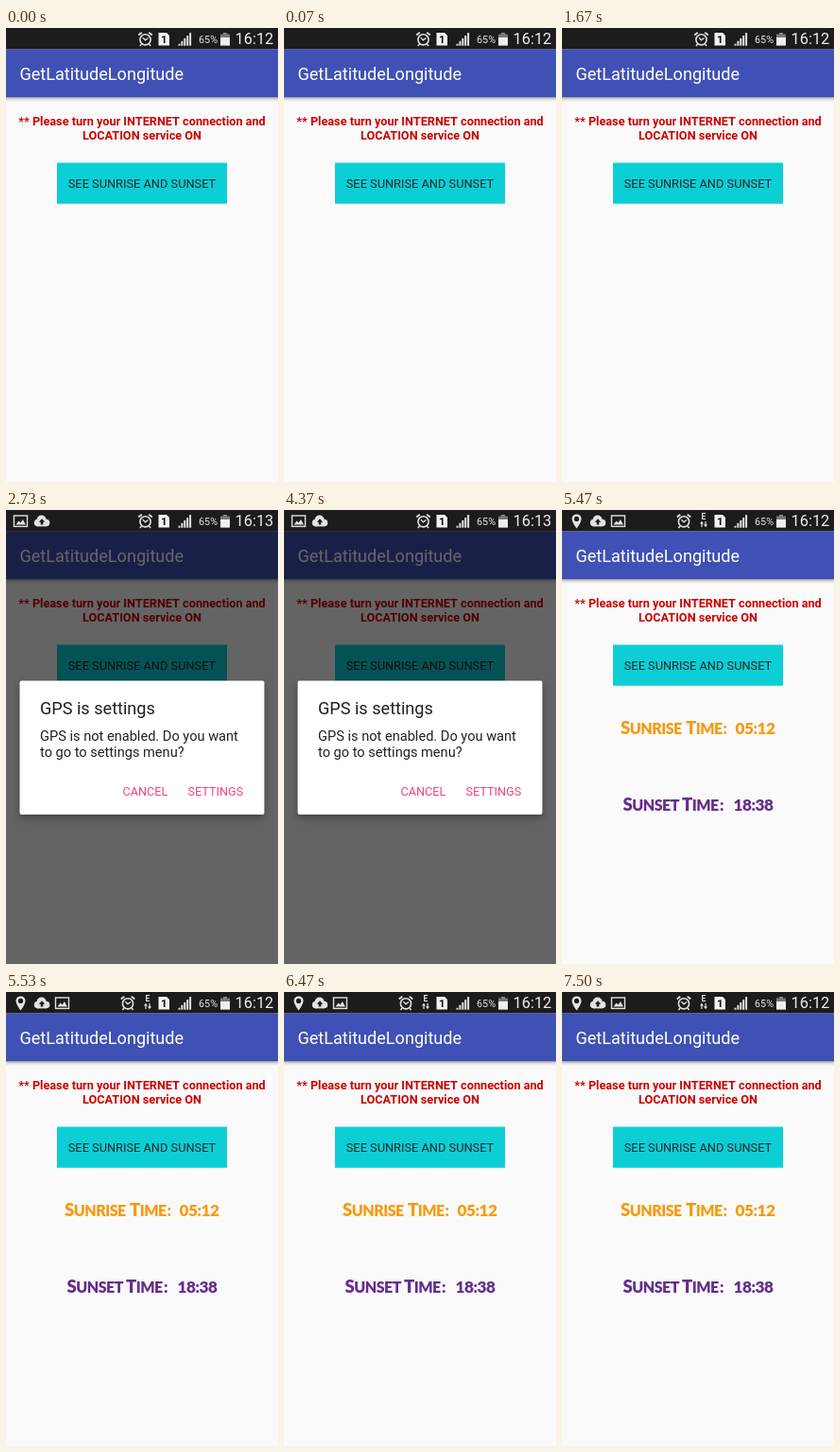
An HTML page with a canvas that plays this animation: 288x480 px, repeating every 8.19 s.

```html
<!DOCTYPE html>
<html lang="en">
<head>
<meta charset="utf-8">
<title>GetLatitudeLongitude</title>
<style>
  html, body { margin: 0; width: 100%; height: 100%; overflow: hidden; background: #fafafa; }
  canvas { display: block; width: 288px; height: 480px; }
</style>
</head>
<body>
<canvas id="stage"></canvas>
<script>
const W = 288, H = 480, LOOP = 8190, DIALOG_AT = 2730, RESULT_AT = 5470;
const canvas = document.getElementById('stage');
const ctx = canvas.getContext('2d');
const dpr = window.devicePixelRatio || 1;
canvas.width = W * dpr;
canvas.height = H * dpr;
ctx.scale(dpr, dpr);

const ICON = '#e2e2e2', BAR = '#1c1c1c', BAR_H = 22.4;
const DISPLAY = { weight: 900, family: 'Lato, sans-serif', spacing: -0.5 };

function rect(x, y, w, h, color) {
  ctx.fillStyle = color;
  ctx.fillRect(x, y, w, h);
}

function text(str, x, y, size, color, { weight = 400, align = 'left', family = 'Roboto, sans-serif', spacing = 0 } = {}) {
  ctx.font = `${weight} ${size}px ${family}`;
  ctx.letterSpacing = spacing + 'px';
  ctx.textAlign = align;
  ctx.fillStyle = color;
  ctx.fillText(str, x, y);
}

function disc(x, y, r, color) {
  ctx.fillStyle = color;
  ctx.beginPath();
  ctx.arc(x, y, r, 0, Math.PI * 2);
  ctx.fill();
}

function poly(points, color) {
  ctx.fillStyle = color;
  ctx.beginPath();
  points.forEach(([x, y]) => ctx.lineTo(x, y));
  ctx.fill();
}

function line(points, width, color) {
  ctx.strokeStyle = color;
  ctx.lineWidth = width;
  ctx.beginPath();
  points.forEach(([x, y], i) => i ? ctx.lineTo(x, y) : ctx.moveTo(x, y));
  ctx.stroke();
}

function alarm(x) {
  ctx.strokeStyle = ICON;
  ctx.lineWidth = 1.6;
  ctx.beginPath();
  ctx.arc(x, 12.3, 5.6, 0, Math.PI * 2);
  ctx.stroke();
  line([[x - 2.6, 10.2], [x, 12.8], [x + 3, 10.6]], 1.3, ICON);
  for (const s of [-1, 1]) {
    line([[x + s * 7.3, 7.4], [x + s * 3.7, 4.8]], 1.8, ICON);
    line([[x + s * 4, 17], [x + s * 5.6, 19]], 1.5, ICON);
  }
}

function sim() {
  poly([[161.5, 5], [170, 5], [173, 8], [173, 18.5], [161.5, 18.5]], '#f2f2f2');
  text('1', 167.3, 16, 11.5, '#111', { weight: 700, align: 'center' });
}

function signal() {
  for (let i = 0; i < 5; i++) {
    const h = 2 + i * 2.9;
    rect(182.5 + i * 2.9, 18.7 - h, 2, h, ICON);
  }
}

function battery() {
  rect(230, 5, 4, 2, '#8a8a8a');
  rect(227, 6.5, 10, 12, '#777');
  rect(227, 10, 10, 8.5, '#eee');
}

function picture(x) {
  ctx.strokeStyle = ICON;
  ctx.lineWidth = 1.4;
  ctx.strokeRect(x - 7, 6, 14, 11.4);
  poly([[x - 5, 15.5], [x - 2, 11.5], [x, 13.4], [x + 2.4, 10], [x + 5.4, 15.5]], ICON);
}

function cloud(x) {
  disc(x - 4.4, 13.6, 3.8, ICON);
  disc(x - 0.4, 10.6, 5, ICON);
  disc(x + 4.5, 13.5, 3.8, ICON);
  rect(x - 4.4, 12, 9, 5.4, ICON);
  poly([[x, 9.2], [x + 3.2, 12.7], [x + 1.3, 12.7], [x + 1.3, 15.6], [x - 1.3, 15.6], [x - 1.3, 12.7], [x - 3.2, 12.7]], BAR);
}

function pin(x) {
  ctx.fillStyle = ICON;
  ctx.beginPath();
  ctx.arc(x, 9.4, 5, Math.PI, 0);
  ctx.quadraticCurveTo(x + 4.8, 13, x, 19.5);
  ctx.quadraticCurveTo(x - 4.8, 13, x - 5, 9.4);
  ctx.fill();
  disc(x, 9.4, 2.6, BAR);
}

function edge(x) {
  text('E', x, 10, 8.5, ICON, { weight: 700, align: 'center' });
  poly([[x - 4, 14.5], [x - 2, 11.8], [x, 14.5]], ICON);
  rect(x - 2.6, 14, 1.2, 4, ICON);
  poly([[x, 15.3], [x + 4, 15.3], [x + 2, 18.2]], ICON);
  rect(x + 1.4, 12, 1.2, 4, ICON);
}

function statusBar(scene) {
  rect(0, 0, W, BAR_H, BAR);
  if (scene === 'dialog') {
    picture(15.5);
    cloud(38);
  } else if (scene === 'result') {
    pin(15.5);
    cloud(38);
    picture(59.5);
    edge(150);
  }
  alarm(scene === 'result' ? 129 : 147.5);
  sim();
  signal();
  text('65%', 204, 16, 10.8, ICON);
  battery();
  text(scene === 'dialog' ? '16:13' : '16:12', 242.5, 17.4, 16.4, '#ededed');
}

function page() {
  rect(0, 0, W, H, '#fafafa');
  const shade = ctx.createLinearGradient(0, 73, 0, 78);
  shade.addColorStop(0, 'rgba(0,0,0,.4)');
  shade.addColorStop(0.4, 'rgba(0,0,0,.14)');
  shade.addColorStop(1, 'rgba(0,0,0,0)');
  rect(0, 73, W, 5, shade);
  rect(0, BAR_H, W, 73 - BAR_H, '#3f51b5');
  text('GetLatitudeLongitude', 14.4, 54.5, 18.1, '#fff');
  const bold = { weight: 700, align: 'center' };
  text('** Please turn your INTERNET connection and', 144, 103.4, 12.7, '#cc0000', bold);
  text('LOCATION service ON', 144, 118, 12.7, '#cc0000', bold);
  rect(54, 142.5, 180, 43.3, '#0ccfd6');
  text('SEE SUNRISE AND SUNSET', 144, 169.3, 12.8, '#20282a', { align: 'center' });
}

function dialog() {
  rect(0, 0, W, H, 'rgba(0,0,0,.6)');
  ctx.fillStyle = '#fff';
  ctx.shadowColor = 'rgba(0,0,0,.35)';
  ctx.shadowBlur = 8 * dpr;
  ctx.shadowOffsetY = 3 * dpr;
  ctx.beginPath();
  ctx.roundRect(14.5, 180.5, 259, 141.5, 2);
  ctx.fill();
  ctx.shadowColor = 'transparent';
  text('GPS is settings', 36, 216, 18.1, '#212121');
  text('GPS is not enabled. Do you want', 36, 244, 14.6, '#212121');
  text('to go to settings menu?', 36, 261, 14.6, '#212121');
  text('CANCEL', 123.5, 301.8, 12.7, '#f0457f');
  text('SETTINGS', 192.5, 301.8, 12.7, '#f0457f');
}

// Small capitals after a larger initial
function word(str, x, y, color) {
  text(str[0], x, y, 18.5, color, DISPLAY);
  const first = ctx.measureText(str[0]).width;
  text(str.slice(1).toUpperCase(), x + first, y, 16, color, DISPLAY);
}

function timeRow(label, time, xs, y, color) {
  word(label, xs[0], y, color);
  word('Time', xs[1], y, color);
  text(':', xs[2], y, 17, color, DISPLAY);
  text(time, xs[3], y, 17.2, color, DISPLAY);
}

function draw() {
  const t = performance.now() % LOOP;
  const scene = t < DIALOG_AT ? 'start' : t < RESULT_AT ? 'dialog' : 'result';
  page();
  if (scene === 'dialog') dialog();
  if (scene === 'result') {
    timeRow('Sunrise', '05:12', [62, 131, 170.5, 183.5], 236.9, '#f79a10');
    timeRow('Sunset', '18:38', [64.5, 127, 167, 181.5], 318.4, '#662d8c');
  }
  statusBar(scene);
  requestAnimationFrame(draw);
}
draw();
</script>
</body>
</html>
```
